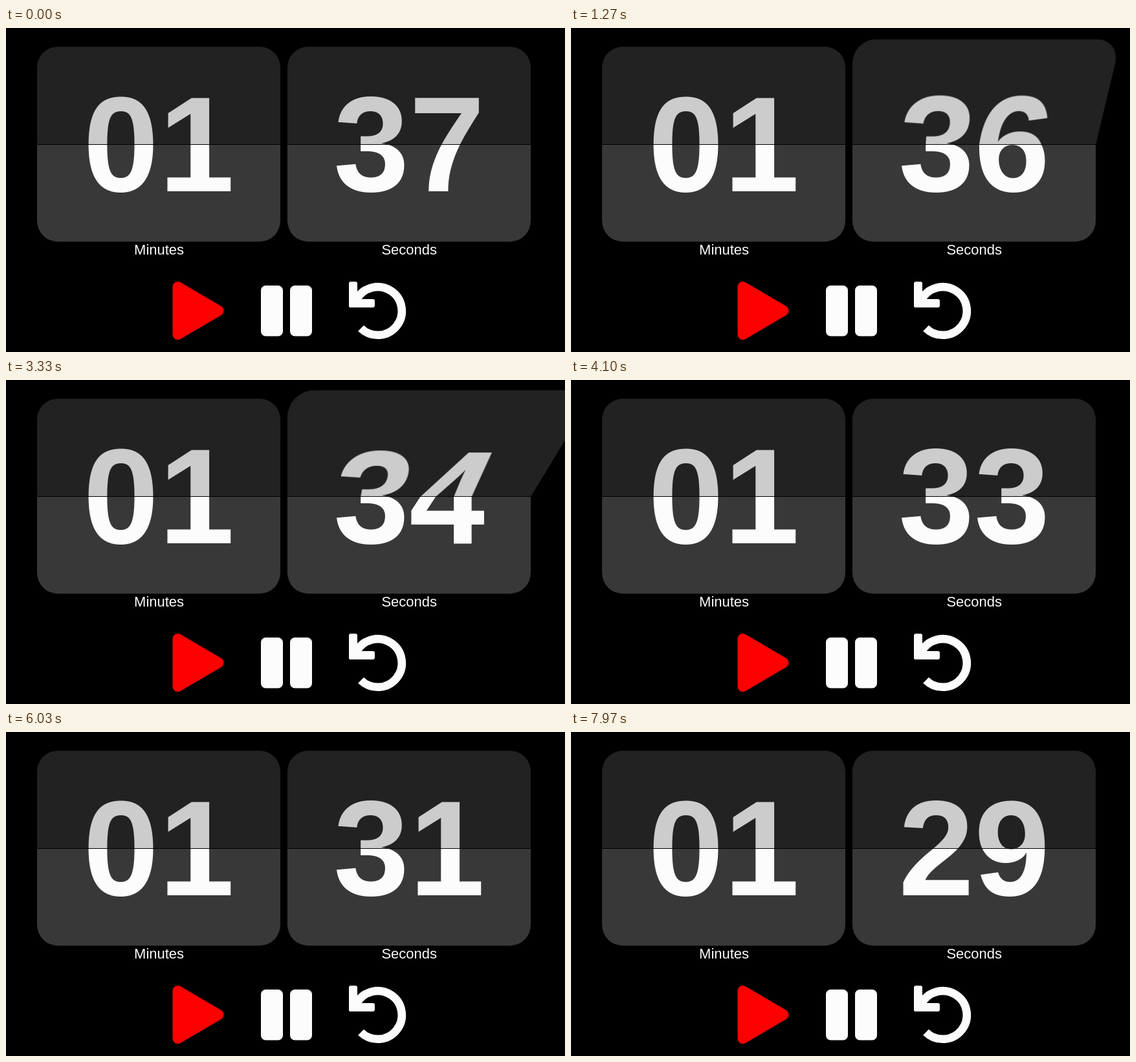
Recreate the animation shown at these times as an HTML page. Size 864 by 502 pixels, loop 8 s.

```html
<!DOCTYPE html>
<html lang="en">
<head>
<meta charset="utf-8">
<title>Countdown</title>
<style>
  html, body { margin: 0; width: 100%; height: 100%; overflow: hidden; background: #000; }
  #stage { position: relative; width: 864px; height: 502px; overflow: hidden; }
  svg { position: absolute; left: 0; top: 0; }
  .card {
    position: absolute; top: 29px; width: 376.3px; height: 302px;
    perspective: 372px; perspective-origin: 0 151.5px;
    font: bold 210px/302px "Liberation Sans", Arial, sans-serif; text-align: center;
  }
  .half { position: absolute; left: 0; width: 100%; overflow: hidden; }
  .half span { position: absolute; left: 0; width: 100%; }
  .top {
    top: 0; height: 151px; border-bottom: 1px solid #000; border-radius: 32px 32px 0 0;
    background: #222; color: #ccc; transform-origin: 0 100%;
  }
  .bottom {
    top: 152px; height: 149.5px; border-radius: 0 0 32px 32px;
    background: #383838; color: #fcfcfc; transform-origin: 0 0;
  }
  .top span { top: 1px; }
  .bottom span { top: -151px; }
</style>
</head>
<body>
<div id="stage">
  <svg width="864" height="502" fill="#fcfcfc">
    <g font-family="Liberation Sans, Arial, sans-serif" font-size="22" text-anchor="middle">
      <text x="236.6" y="351">Minutes</text>
      <text x="623.2" y="351">Seconds</text>
    </g>
    <path d="M265.5 401V475L328.5 438Z" fill="#f00" stroke="#f00" stroke-width="16" stroke-linejoin="round"/>
    <rect x="394" y="399" width="34" height="78.5" rx="7.5"/>
    <rect x="439" y="399" width="34" height="78.5" rx="7.5"/>
    <rect x="530" y="393" width="13" height="40" rx="3"/>
    <rect x="530" y="420" width="40" height="13" rx="3"/>
    <path d="M541.6 421A37.3 37.3 0 1 1 548.6 465.3" fill="none" stroke="#fcfcfc" stroke-width="12.6"/>
  </svg>
  <div class="card" id="minutes" style="left:48px"></div>
  <div class="card" id="seconds" style="left:435px"></div>
</div>
<script>
const LOOP = 8000, FIRST_FLIP = 187, FLIP_EVERY = 1004, HALF_FLIP = 250, START = 37;

function addHalf(cardId, side) {
  const half = document.createElement('div');
  half.className = 'half ' + side;
  half.append(document.createElement('span'));
  document.getElementById(cardId).append(half);
  return half;
}

function setNumber(half, value) {
  const text = String(value).padStart(2, '0');
  if (half.firstChild.textContent !== text) half.firstChild.textContent = text;
}

for (const side of ['top', 'bottom']) setNumber(addHalf('minutes', side), 1);
const upper = addHalf('seconds', 'top');
const lower = addHalf('seconds', 'bottom');
const upperFlap = addHalf('seconds', 'top');
const lowerFlap = addHalf('seconds', 'bottom');

const easeIn = x => x ** 1.68;

function showFlap(flap, visible, angle) {
  flap.style.display = visible ? 'block' : 'none';
  flap.style.transform = `rotateX(${angle}deg)`;
}

function draw(time) {
  const flips = Math.floor((time - FIRST_FLIP) / FLIP_EVERY) + 1;
  const next = START - flips;
  const phase = flips ? (time - FIRST_FLIP - (flips - 1) * FLIP_EVERY) / HALF_FLIP : 2;

  setNumber(upper, next);
  setNumber(lower, phase < 2 ? next + 1 : next);
  setNumber(upperFlap, next + 1);
  setNumber(lowerFlap, next);

  // The old upper half falls toward the viewer, then the new lower half lands.
  const falling = phase < 1, landing = phase >= 1 && phase < 2;
  showFlap(upperFlap, falling, falling ? -90 * easeIn(phase) : 0);
  showFlap(lowerFlap, landing, landing ? 90 * easeIn(2 - phase) : 0);
}

function tick() {
  draw(performance.now() % LOOP);
  requestAnimationFrame(tick);
}
tick();
</script>
</body>
</html>
```
